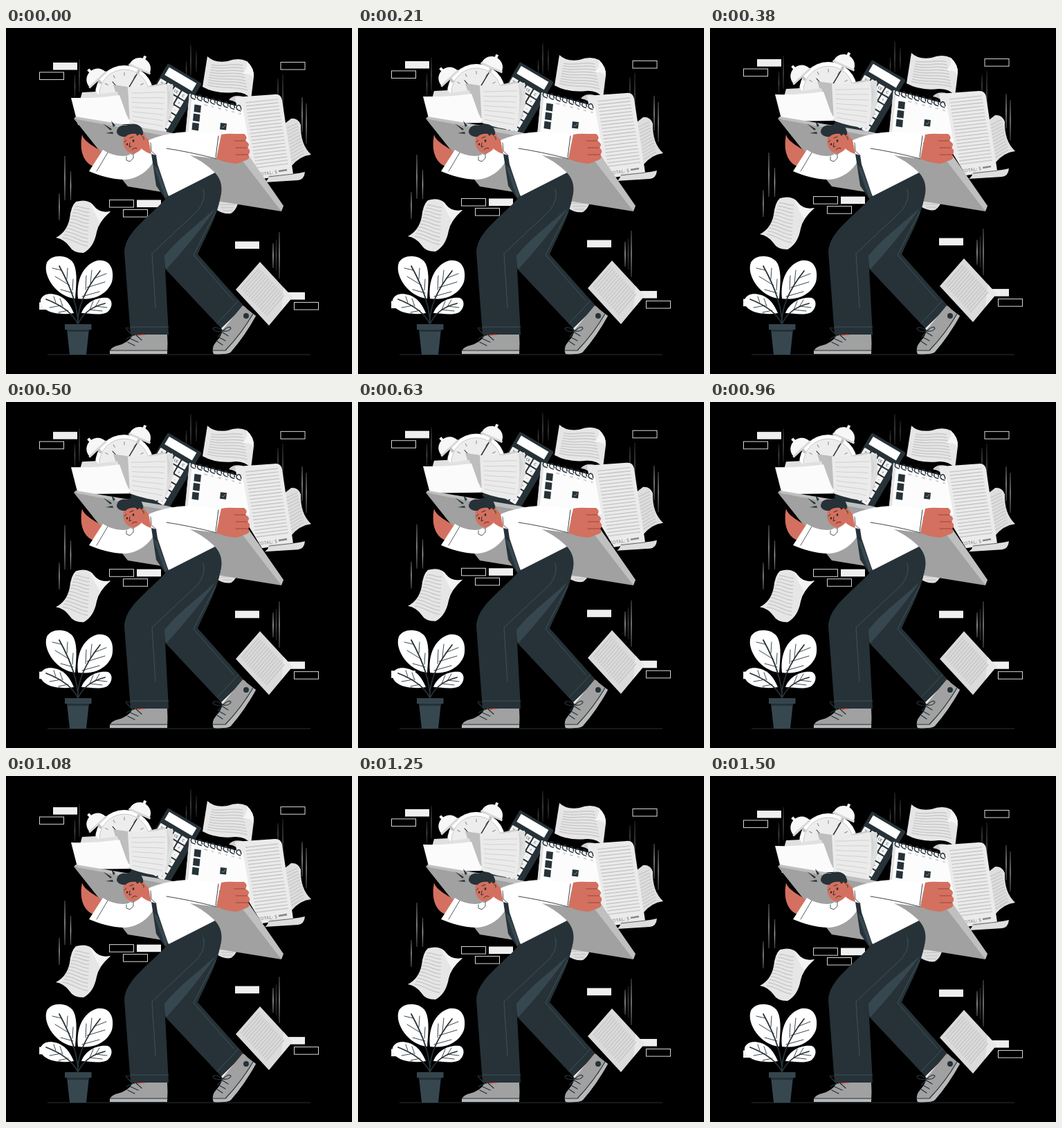
An HTML page that plays this animation: 500x500 px, repeating every 1.54 s.

```html
<!DOCTYPE html>
<html lang="en">
<head>
<meta charset="utf-8">
<title>Overloaded at work</title>
<style>
html, body { margin: 0; width: 100%; height: 100%; overflow: hidden; background: #000; }
svg { display: block; width: 100vw; height: 100vh; }
text { font-family: Lato, Arial, sans-serif; }
.ink { fill: #263238; }
.slate { fill: #37474f; }
.skin { fill: #d4705f; }
.white { fill: #fff; }
.line { fill: none; stroke: #263238; stroke-linecap: round; stroke-linejoin: round; }
</style>
</head>
<body>
<svg viewBox="0 0 500 500">
  <rect width="500" height="500"/>
  <path d="M60 472H440" stroke="#263238" stroke-width="1"/>

  <g id="float">
    <g id="streaks"></g>
    <g id="bars"></g>

    <!-- loose sheets -->
    <g id="topSheet">
      <path d="M291 41Q301 51 320 48Q336 42 348 48Q359 58 358 71L354 103Q346 92 330 93Q304 96 284 85Z" fill="#e6e6e6"/>
      <path d="M348 48Q359 58 358 71Q350 64 340 67Q350 60 348 48Z" fill="#f5f5f5"/>
    </g>
    <g id="rightSheet">
      <path d="M398 142L412 131Q422 130 426 140Q425 168 441 183Q424 185 412 200L400 200Z" fill="#dedede"/>
    </g>
    <g id="leftSheet">
      <path d="M101 251Q119 246 127 257Q136 269 151 265Q134 280 131 295Q127 317 112 325Q97 325 92 316Q84 305 72 303Q88 295 92 275Q94 257 101 251Z" fill="#e6e6e6"/>
      <path d="M121 251Q133 269 151 265Q141 274 136 281Q126 265 121 251Z" fill="#f3f3f3"/>
    </g>
    <g id="lowSheet">
      <path d="M367 338L414 389L380 430L332 378Z" fill="#dbdbdb"/>
      <path d="M401 375L414 389L398 408Z" fill="#e8e8e8"/>
    </g>
    <g id="underSheet">
      <path d="M296 244H337Q335 262 325 268Q315 270 303 262Z" fill="#dedede"/>
    </g>

    <!-- receipt -->
    <g id="receipt">
      <path d="M322 104Q328 96 342 99L348 118L338 116Q334 105 322 104Z" fill="#cfcfcf"/>
      <path d="M331 100L388 96Q397 95 399 104L415 211L370 218L344 175Z" fill="#ebebeb"/>
      <path d="M380 212L414 211Q424 210 432 208Q431 219 422 220L374 223Q380 219 380 212Z" fill="#dedede"/>
      <path d="M380 215L415 211" class="line" stroke-width=".7"/>
      <text transform="translate(364 214) rotate(-8)" font-size="6.3" letter-spacing=".35" fill="#777">TOTAL: $</text>
      <path d="M394 207L406 205" stroke="#888" stroke-width="2.6"/>
    </g>

    <!-- alarm clock -->
    <g>
      <circle cx="171" cy="96" r="42" class="white"/>
      <circle cx="171" cy="96" r="36" fill="#ededed" stroke="#bdbdbd" stroke-width=".8"/>
      <g id="ticks"></g>
      <path d="M171 97L189 67" class="line" stroke-width="1.5"/>
      <path d="M171 97L154 78" class="line" stroke-width="1.1"/>
      <g id="bells"></g>
    </g>

    <!-- calculator -->
    <g id="calc" transform="translate(234 51) rotate(30.6)">
      <rect width="57" height="108" rx="2" class="ink"/>
      <rect x="4.5" y="4" width="46" height="13" class="white"/>
    </g>

    <!-- folder and papers -->
    <path d="M155 82L183 86L182 138L164 110Z" fill="#bebebe"/>
    <path d="M107 104L110 93L130 92L133 96L161 92L168 118Z" fill="#e0e0e0"/>
    <path d="M205 84L229 79L242 94L238 128L228 148Z" fill="#cfcfcf"/>
    <path d="M222 83L241 81L242 112L230 145Z" fill="#dedede"/>
    <g id="frontSheet">
      <path d="M176 85Q204 88 232 81L238 98L229 150Q203 148 179 139Z" fill="#ebebeb"/>
      <path d="M232 81L238 98L229 150Q236 119 232 81Z" fill="#d4d4d4"/>
    </g>
    <path d="M94 101Q130 102 164 97L179 139L104 140Z" fill="#fbfbfb"/>

    <!-- desk calendar -->
    <g id="calendar">
      <path d="M265 95L342 115L352 170H258Z" fill="#fcfcfc"/>
      <path d="M265 95L258 165L262 165L269 96Z" fill="#e2e2e2"/>
    </g>
  </g>

  <!-- board -->
  <path d="M98 131L176 229L398 265L345 178L230 152Z" fill="#a1a1a1"/>
  <path d="M98 131L101 128L232 150L345 176L401 257L398 265L338 187L230 156Z" fill="#c0c0c0"/>
  <g class="ink">
    <path d="M140 138L153 146L151 148Z"/>
    <path d="M144 152L154 150L155 153Z"/>
    <path d="M152 134L158 141L155 143Z"/>
  </g>

  <!-- rear leg -->
  <path d="M311 236C308 268 290 297 277 327L344 402L311 434L231 349Q225 338 231 328L290 250Z" class="ink"/>
  <path d="M303 261C272 282 240 308 228 330L231 349C255 324 282 290 303 261Z" class="slate"/>
  <path d="M303 266Q286 298 271 328L329 394" class="line" style="stroke:#455a64" stroke-width=".8"/>
  <path d="M305 427L336 394" class="line" style="stroke:#455a64" stroke-width=".8"/>

  <!-- rear shoe -->
  <path d="M311 434L344 402L348 406L315 440Z" fill="#f0f0f0"/>
  <path d="M342 401L361 416Q345 445 325 468Q321 472 300 471Q296 462 304 453Q311 446 313 436Z" fill="#a1a1a1"/>
  <path d="M361 416Q345 445 325 468Q321 472 300 471L299 466L317 466Q340 442 357 413Z" fill="#b9b9b9"/>
  <circle cx="347" cy="416" r="4" class="ink"/>
  <path d="M314 438Q301 429 299 435Q302 440 313 438Q323 429 325 434Q322 439 314 438M312 440L306 446M313 440L321 445M308 447L317 452M304 452L313 458M299 466H317Q340 442 357 413" class="line" stroke-width="1.2"/>

  <!-- front shoe -->
  <path d="M186 440H208V446H186Z" class="skin"/>
  <path d="M183 444Q195 447 206 442L233 442Q234 456 233 471H150Q149 462 161 459Q177 455 183 444Z" fill="#a1a1a1"/>
  <path d="M150 466H233L233 471H150Z" fill="#b9b9b9"/>
  <path d="M150 466H233M176 454L186 459M180 449L191 454M183 444Q171 433 174 433Q182 433 187 443Q200 434 204 438Q202 443 187 443M184 444L174 449M187 443L196 451" class="line" stroke-width="1.2"/>

  <!-- front leg -->
  <path d="M234 243L301 208C315 222 314 240 304 259C276 285 249 304 229 329L235 443H180L171 324C172 294 207 274 234 243Z" class="ink"/>
  <path d="M285 233Q290 247 277 264Q245 294 211 326L216 404M180 432H235" class="line" style="stroke:#455a64" stroke-width=".8"/>

  <!-- far arm -->
  <path d="M110 154C112 164 128 171 140 180L127 200C114 196 105 180 110 154Z" class="skin"/>
  <path d="M140 176C153 184 168 188 186 182L207 163L216 187C208 207 189 218 172 219C152 219 135 213 120 207Z" class="white"/>
  <path d="M147 180L131 207" class="line" stroke-width=".8"/>

  <!-- torso and near arm -->
  <path d="M204 163C221 155 241 151 264 150L311 154L304 189L266 184C283 192 296 203 302 209L235 243L224 222L209 184Z" class="white"/>
  <path d="M232 174Q265 179 304 189M307 156L303 187" class="line" stroke-width=".9"/>
  <path d="M210 182L217 184L219 197L235 244L231 248L217 228L212 195Z" class="ink"/>
  <path d="M213 198L219 202L234 242L230 246Z" class="slate"/>

  <!-- head -->
  <path d="M199 154L206 162L210 182Q202 180 194 173Z" class="skin"/>
  <path d="M171 154C166 169 173 181 184 181C196 180 201 168 200 153Q183 144 171 154Z" class="skin"/>
  <path d="M160 151C160 142 168 139 175 141C182 136 195 139 197 147Q200 153 196 156L193 153Q189 158 188 153Q178 152 173 157Q163 158 160 151Z" class="ink"/>
  <circle cx="198" cy="159" r="4" class="skin"/>
  <g class="ink">
    <ellipse cx="175" cy="168" rx="1.3" ry="1.8"/>
    <ellipse cx="184" cy="163" rx="1.4" ry="2"/>
  </g>
  <path d="M171 165L174 162M179 159L184 157M179 166L178 172L181 171M182 176Q185 172 189 174M197 157Q200 157 199 161" class="line" stroke-width="1"/>
  <path d="M173 186L180 182L184 186L181 192L175 193Z" class="white"/>
  <path d="M184 182L184 188L179 193L174 191L174 186M209 166L210 178L217 184" class="line" stroke-width=".8"/>

  <!-- near hand -->
  <path d="M311 154Q320 152 331 153L344 153Q350 157 346 163Q354 167 349 173Q355 178 350 183Q354 188 347 191L334 196Q320 196 304 189Z" class="skin"/>
  <path d="M330 163H346M332 173H349M332 183H350" fill="none" stroke="#99463e" stroke-width="1" stroke-linecap="round"/>

  <!-- plant -->
  <g class="white">
    <path d="M100 391C74 389 52 358 59 339C66 326 91 327 98 341C104 354 101 376 100 391Z"/>
    <path d="M104 391C101 365 111 342 132 336C151 333 157 350 153 367C146 386 125 394 104 391Z"/>
    <path d="M98 412C76 416 48 410 50 393C54 381 72 383 82 390C90 395 95 405 98 412Z"/>
    <path d="M109 412C114 398 130 388 147 390C156 394 153 406 146 411C135 416 120 412 109 412Z"/>
  </g>
  <path d="M104 428Q104 393 77 344M104 428Q102 394 136 351M104 428Q94 406 58 392M104 428Q114 405 143 398" class="line" stroke-width="1.8"/>
  <path d="M88 363L89 347M92 372L71 359M97 383L79 378M96 379L97 363M80 350L67 347M115 378L116 358M122 369L124 350M110 388L135 381M117 375L143 367M127 362L145 355M72 397L69 388M82 402L78 391M80 401L63 404M90 408L76 411M121 407L126 395M129 403L135 393M121 407L139 409M130 402L146 404" class="line" stroke-width=".9"/>
  <path d="M88 435H120L116 472H92Z" class="slate"/>
  <path d="M85 428H123.500V436H85Z" fill="#35454d"/>
  <path d="M88 436H120V439H89Z" class="ink"/>
</svg>
<script>
const LOOP = 1540, RISE = 8.6, LEAD = 40;
const $ = id => document.getElementById(id);

function add(parent, tag, attrs, text) {
  const el = document.createElementNS("http://www.w3.org/2000/svg", tag);
  for (const k in attrs) el.setAttribute(k, attrs[k]);
  if (text) el.textContent = text;
  $(parent).appendChild(el);
}

// Ruled lines between two edges; bend lifts the first half and drops the second.
function rule(parent, a, b, c, d, n, bend = 0, width = 1.5) {
  const mix = (p, q, k) => p + (q - p) * k;
  let path = "";
  for (let i = 0; i < n; i++) {
    const k = i / (n - 1);
    const x0 = mix(a[0], b[0], k), y0 = mix(a[1], b[1], k);
    const x1 = mix(c[0], d[0], k), y1 = mix(c[1], d[1], k);
    path += `M${x0} ${y0}C${mix(x0, x1, .35)} ${mix(y0, y1, .35) + bend} ${mix(x0, x1, .65)} ${mix(y0, y1, .65) - bend} ${x1} ${y1}`;
  }
  add(parent, "path", { d: path, fill: "none", stroke: "#c9c9c9", "stroke-width": width });
}

rule("topSheet", [297, 53], [291, 82], [342, 54], [349, 90], 9, 4);
rule("rightSheet", [405, 145], [412, 192], [421, 138], [431, 181], 11, 1);
rule("leftSheet", [100, 258], [82, 303], [121, 261], [118, 315], 11, -3);
rule("lowSheet", [340, 377], [376, 416], [366, 347], [402, 386], 14, 0, 1.7);
rule("underSheet", [306, 251], [313, 264], [333, 251], [327, 264], 4);
rule("receipt", [346, 108], [361, 202], [393, 103], [408, 196], 20, 0, 1.6);
rule("frontSheet", [181, 94], [183, 134], [230, 93], [226, 142], 7, 1, .8);

// Floating bars: x, y, filled
[[68, 50, 1], [48.5, 64, 0], [397, 49.5, 0], [149.5, 248.5, 0], [189, 248.5, 1],
 [169.5, 262.5, 0], [331, 308.5, 1], [397, 382, 1], [416.5, 396.5, 0], [48, 396.5, 1]]
  .forEach(([x, y, full]) => add("bars", "rect", {
    x, y, width: 35, height: 10.6, fill: full ? "#efefef" : "#000",
    stroke: full ? "none" : "#d8d8d8", "stroke-width": 1
  }));

// Tapered streaks: x, top, length, opacity
[[85, 185, 64, .65], [93.5, 207, 42, .65], [77, 239, 39, .65],
 [106, 45, 48, .3], [99.5, 68, 32, .3], [267, 24, 45, .3], [260.5, 48, 22, .25], [275, 34, 30, .25],
 [400, 67, 62, .3], [393, 73, 30, .3], [428, 100, 50, .65], [434, 109, 58, .6],
 [395, 295, 67, .6], [386, 311, 36, .7], [390.5, 306, 45, .3]]
  .forEach(([x, y, h, o]) => add("streaks", "path", {
    d: `M${x} ${y}l.6 ${h / 2}l-.6 ${h / 2}l-.6 ${-h / 2}Z`, fill: "#fff", stroke: "#fff", "stroke-width": .3, opacity: o
  }));

for (let i = 0; i < 12; i++)
  add("ticks", "path", { d: "M171 64v5", stroke: "#8a8a8a", "stroke-width": 1, transform: `rotate(${i * 30} 171 96)` });

[[131, 73, -43], [194, 57, 24]].forEach(([x, y, turn]) => {
  const transform = `translate(${x} ${y}) rotate(${turn})`;
  add("bells", "path", { d: "M-2 -18h4v6h-4ZM-16 2C-15 -19 15 -19 16 2Z", fill: "#f7f7f7", transform });
  add("bells", "path", { d: "M-17 1H17V4H-17Z", fill: "#d8d8d8", transform });
  add("bells", "path", { d: "M-2 4h4v6h-4Z", fill: "#c4c4c4", transform });
});

for (let r = 0; r < 6; r++)
  for (let c = 0; c < 4; c++) {
    const x = 7 + c * 12, y = 29 + r * 12;
    add("calc", "rect", { x: x - 5, y: y - 5, width: 10, height: 10, rx: 1, fill: "#f3f3f3" });
    const label = r ? (c < 3 ? "" + (r * 3 + c) % 10 : "+-=×÷"[r - 1]) : ["%", "M", "CE", "C"][c];
    add("calc", "text", { x, y: y + 2, "font-size": 5, "text-anchor": "middle", fill: "#263238" }, label);
  }

// Calendar: binding, weekday labels, marked days
for (let i = 0; i < 8; i++) {
  const x = 271 + i * 9.4, y = 99 + i * 2.4;
  add("calendar", "path", { d: `M${x + 2} ${y + 4}q-8 -2 -5 -7q5 -4 6 5`, class: "line", "stroke-width": 1.5 });
  if (i < 6) add("calendar", "text", {
    transform: `translate(${286 + i * 10} ${112 + i * 2.5}) rotate(14)`, "font-size": 3, fill: "#777"
  }, ["MO", "TU", "WE", "TH", "FR", "SA"][i]);
}
for (let i = 0; i < 3; i++)
  add("calendar", "path", { d: `M${272.5 - i * 1.5} ${110.500 + i * 13}l9.500 1.500l-1 10.500l-9.500 -1.500Z`, class: "ink" });
add("calendar", "path", { d: "M310 137l9 1l-1 9.500l-9 -1Z", class: "ink" });
add("calendar", "path", { d: "M312 143l2 1l3 -4", fill: "none", stroke: "#90a4ae", "stroke-width": .8 });

function draw(now) {
  const lift = RISE * (1 - Math.cos(2 * Math.PI * (now % LOOP + LEAD) / LOOP)) / 2;
  $("float").setAttribute("transform", `translate(0 ${-lift.toFixed(3)})`);
}

const start = performance.now();
function tick() {
  draw(performance.now() - start);
  requestAnimationFrame(tick);
}
tick();
</script>
</body>
</html>
```
